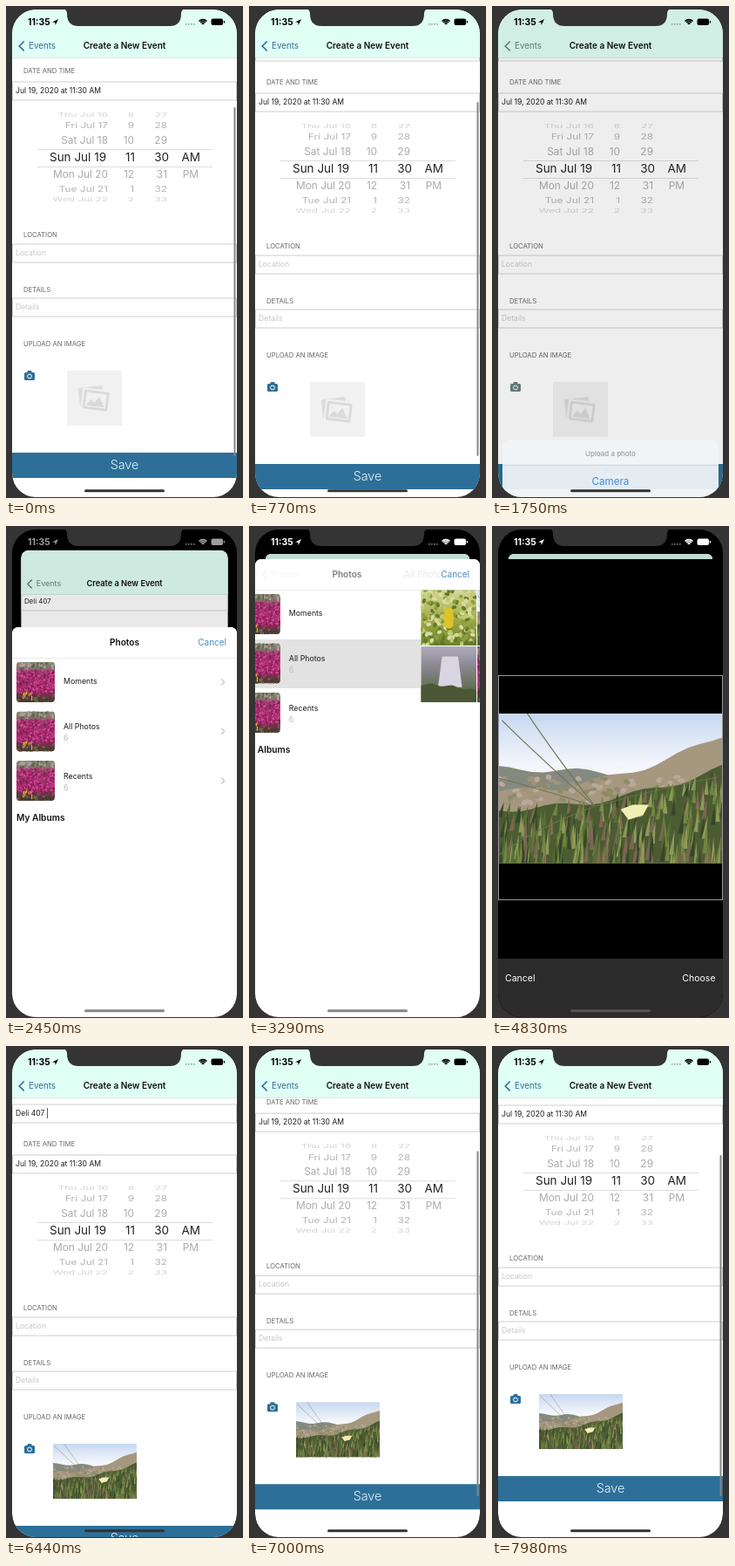
These frames come from a looping animation (272 by 564 pixels, 8000 ms). An HTML page with a canvas:

```html
<!DOCTYPE html>
<html lang="en">
<head>
<meta charset="utf-8">
<title>Create a New Event</title>
<style>
html, body { margin: 0; width: 100%; height: 100%; overflow: hidden; background: #343434; }
canvas { display: block; width: 272px; height: 564px; }
</style>
</head>
<body>
<canvas id="stage"></canvas>
<script>
const LOOP = 8000;
const BLUE = '#2d6f98', INACTIVE = '#66807f', LINK = '#4a8cc0', INK = '#1c1c1c';
const LEFT = 7, TOP = 4, WIDTH = 258, HEIGHT = 559, MID = 136;
const canvas = document.getElementById('stage');
const dpr = window.devicePixelRatio || 1;
canvas.width = 272 * dpr;
canvas.height = 564 * dpr;
const c = canvas.getContext('2d');

// ---- timing ----
const lerp = (a, b, k) => a + (b - a) * k;
const between = (t, a, b) => t >= a && t < b;

function ease(t, start, end) {
  const k = Math.min(1, Math.max(0, (t - start) / (end - start)));
  return k * (2 - k);
}

function spring(t, start, speed) {
  const x = Math.max(0, t - start) * speed;
  const v = 1 - (1 + x) * Math.exp(-x);
  return v > 0.995 ? 1 : v;
}

// ---- drawing helpers ----
function scoped(draw) { c.save(); draw(); c.restore(); }
function shifted(dx, draw) { scoped(() => { c.translate(dx, 0); draw(); }); }

function rect(x, y, w, h, color, r = 0) {
  c.fillStyle = color;
  c.beginPath();
  c.roundRect(x, y, w, h, r);
  c.fill();
}

function frame(x, y, w, h, color) {
  c.strokeStyle = color;
  c.lineWidth = 1;
  c.strokeRect(x, y, w, h);
}

function clip(x, y, w, h, r = 0) {
  c.beginPath();
  c.roundRect(x, y, w, h, r);
  c.clip();
}

function arc(x, y, r, from, to, color, width) {
  c.strokeStyle = color;
  c.lineWidth = width;
  c.beginPath();
  c.arc(x, y, r, from, to);
  c.stroke();
}

function text(str, x, y, size, color, align = 'left', weight = 400) {
  c.font = `${weight} ${size}px Inter, Roboto, sans-serif`;
  c.textAlign = align;
  c.textBaseline = 'middle';
  c.fillStyle = color;
  c.fillText(str, x, y);
}

function poly(color, ...points) {
  c.fillStyle = color;
  c.beginPath();
  for (const [x, y] of points) c.lineTo(x, y);
  c.fill();
}

function chevron(x, y, color, dir = -1, size = 5.5) {
  const dx = dir * size / 2;
  c.strokeStyle = color;
  c.lineWidth = size / 3.4;
  c.beginPath();
  c.moveTo(x - dx, y - size);
  c.lineTo(x + dx, y);
  c.lineTo(x - dx, y + size);
  c.stroke();
}

// ---- photos: soft gradients, wavy ridges and seeded dabs in a 1 x 1 square ----
const noise = n => { const v = Math.sin(n * 12.9898) * 43758.5453; return v - Math.floor(v); };

function fade(...colors) {
  const g = c.createLinearGradient(0, 0, 0, 1);
  colors.forEach((color, i) => g.addColorStop(i / (colors.length - 1), color));
  rect(0, 0, 1, 1, g);
}

// Ground whose upper edge runs from one height to another
function ridge(color, from, to) {
  c.fillStyle = color;
  c.beginPath();
  for (let x = 0; x <= 1.01; x += 0.05) c.lineTo(x, lerp(from, to, x * x) + 0.02 * Math.sin(x * 17 + from * 30));
  c.lineTo(1, 1);
  c.lineTo(0, 1);
  c.fill();
}

function dabs(count, top, bottom, size, ...colors) {
  for (let i = 0; i < count; i++) {
    const n = i + top * 50;
    c.fillStyle = colors[i % colors.length];
    c.beginPath();
    c.ellipse(noise(n), lerp(top, bottom, noise(n + 0.4)), size, size * 0.7, noise(n + 0.7) * 3, 0, 7);
    c.fill();
  }
}

function cascade(x, y, width, height, color) {
  poly(color, [x, y], [x + width * 0.8, y], [x + width, y + height], [x - width * 0.2, y + height]);
}

function dunes() {
  fade('#c6d8f1', '#f2f5fa', '#ffffff', '#ffffff');
  ridge('#858a80', 0.37, 0.5);
  ridge('#a5987f', 0.52, 0.14);
  dabs(90, 0.42, 0.6, 0.018, '#b9a999', '#a1937c', '#8f8a69');
  ridge('#4b5b32', 0.64, 0.36);
  for (let i = 0; i < 300; i++) {
    const depth = i / 300, x = noise(i + 0.3), size = 0.05 + depth * 0.05;
    const y = lerp(0.64 - 0.26 * x * x, 1.02, depth);
    const color = ['#71863f', '#37462a', '#566f34', '#7d6653', '#8d9a58'][i % 5];
    poly(color, [x - 0.008, y + size], [x + 0.02 * noise(i + 9), y - size], [x + 0.012, y + size]);
  }
  c.strokeStyle = '#6d7450';
  c.lineWidth = 0.005;
  for (const angle of [-2.4, -2.2, -2.87, 2.65, -0.23]) {
    const dx = 0.56 * Math.cos(angle), dy = 0.85 * Math.sin(angle);
    c.beginPath();
    c.moveTo(0.43, 0.62);
    c.quadraticCurveTo(0.43 + dx * 0.6, 0.58 + dy * 0.5, 0.43 + dx, 0.62 + dy);
    c.stroke();
  }
  poly('#f2edb4', [0.545, 0.64], [0.6, 0.61], [0.67, 0.61], [0.645, 0.68], [0.58, 0.71]);
}

function lemons() {
  fade('#d5d99a', '#a3ad4a', '#6d842e');
  dabs(160, 0, 1, 0.045, '#8c9f3d', '#bfc96e', '#637a2a', '#d8dca0');
  rect(0.42, 0.32, 0.16, 0.38, '#dfc227', 0.08);
}

function goldenFalls() {
  fade('#b9a98d', '#f1dcae', '#a98f68', '#4e4a2b');
  cascade(0.4, 0.3, 0.5, 0.3, '#ece7dc');
  ridge('#49462b', 0.48, 0.72);
  dabs(110, 0.6, 1, 0.03, '#70713a', '#38371f', '#857a40');
}

function whiteFalls() {
  fade('#cfd0d4', '#74777a', '#45483a');
  ridge('#4a4c38', 0.75, 0.15);
  dabs(60, 0.5, 1, 0.04, '#676a3c', '#33362b', '#55583f');
  cascade(0.25, 0, 0.35, 0.5, '#f4f4f6');
  cascade(0.2, 0.45, 0.25, 0.55, '#e9e9ed');
}

function paleFalls() {
  fade('#b0acba', '#8d8996', '#6c735f', '#4a5639');
  cascade(0.38, 0.18, 0.36, 0.55, '#d8d4e2');
  ridge('#4b5836', 0.68, 0.8);
}

function blossoms() {
  fade('#8c9380', '#97386a', '#a82a69', '#3d3b2a');
  dabs(50, 0, 0.18, 0.035, '#5a6448', '#aaa595', '#79805e');
  dabs(420, 0.2, 0.8, 0.028, '#bd2f7b', '#7a1c4c', '#d2509a', '#9c2566');
  dabs(90, 0.8, 1, 0.03, '#39422a', '#686b45', '#7a2a52');
  shifted(0.1, () => { c.scale(0.32, 1); dabs(10, 0.77, 0.95, 0.045, '#ecc52c'); });
}

// Paints a picture of the given aspect ratio so that it covers the box
function photo(paint, x, y, w, h, r = 0) {
  const aspect = paint === dunes ? 1.505 : 1;
  const tall = Math.max(h, w / aspect), wide = tall * aspect;
  scoped(() => {
    clip(x, y, w, h, r);
    c.translate(x + (w - wide) / 2, y + (h - tall) / 2);
    c.scale(wide, tall);
    paint();
  });
}

// ---- event form; every part hangs on the scroll position s ----
function field(y, label, color) {
  frame(LEFT + 0.5, y - 10, WIDTH - 1, 21, '#cfcfcf');
  text(label, 11, y, 8.6, color);
}

function picker(cy) {
  const names = ['Thu', 'Fri', 'Sat', 'Sun', 'Mon', 'Tue', 'Wed'];
  const shades = ['#222', '#aaa', '#b4b4b4', '#d2d2d2'];
  names.forEach((name, i) => {
    const d = i - 3, far = Math.abs(d), angle = d * 0.36;
    const size = far ? 11.9 : 13.5, grow = far ? 0 : 1;
    const put = (label, x) => text(label, x, 0, size, shades[far], 'right');
    scoped(() => {
      c.translate(0, cy + 55 * Math.sin(angle));
      c.scale(1, Math.cos(angle));
      put(`${name} Jul ${16 + i}`, 117 - 2 * grow);
      put((i + 7) % 12 + 1, 147 + grow);
      put(27 + i, 185 + 2 * grow);
      if (d === 0) put('AM', 223);
      if (d === 1) put('PM', 221);
    });
  });
  for (const side of [-10, 10]) rect(36, cy + side, 201, 1, '#ddd');
}

function cameraIcon(x, y, tint) {
  rect(x - 6, y - 4, 12, 9, tint, 1.5);
  rect(x - 2.5, y - 6, 5, 3, tint, 1);
  arc(x, y + 0.5, 2.4, 0, 7, '#fff', 1);
}

function placeholder(x, y) {
  rect(x, y, 63, 63, '#f1f1f1');
  scoped(() => {
    c.translate(x + 32, y + 31);
    c.rotate(-0.12);
    rect(-18, -13, 28, 22, '#dcdcdc', 2);
    c.rotate(0.24);
    rect(-15, -10, 32, 25, '#f1f1f1', 2);
    rect(-13, -8, 29, 22, '#dadada', 2);
    rect(-10, -5, 23, 16, '#f1f1f1');
    poly('#dadada', [-9, 10], [-4, 2], [0, 6], [5, -2], [12, 10]);
  });
}

function form(t, s, tint) {
  rect(LEFT, TOP, WIDTH, 560, '#fff');
  field(s - 36, 'Deli 407', INK);
  if (t > 5880) rect(47, s - 42, 1, 12, BLUE);
  field(s + 22, 'Jul 19, 2020 at 11:30 AM', INK);
  field(s + 208, 'Location', '#c6c6c6');
  field(s + 270, 'Details', '#c6c6c6');
  text('DATE AND TIME', 20, s, 7.7, '#666');
  ['LOCATION', 'DETAILS', 'UPLOAD AN IMAGE'].forEach((label, i) => text(label, 20, s + 188 + i * 62.3, 7.7, '#666'));
  picker(s + 99);
  cameraIcon(27, s + 349, tint);
  if (t > 5460) photo(dunes, 54, s + 343, 96, 63);
  else placeholder(70, s + 343);
  rect(LEFT, s + 437, WIDTH, 29, BLUE);
  text('Save', MID, s + 452, 14.3, '#eaf4fa', 'center', 300);

  scoped(() => {
    c.globalAlpha = 1 - ease(t, 850, 1150) + ease(t, 6480, 6600);
    const top = 116 + (75 - s) * 0.47;
    rect(261.5, top, 2, 516 - top, '#858585', 1);
  });

  rect(LEFT, TOP, WIDTH, 55, '#e0fff5');
  rect(LEFT, 59, WIDTH, 0.6, '#bccfca');
  chevron(18, 46, tint);
  text('Events', 26, 46, 9.8, tint);
  text('Create a New Event', MID, 46, 10, '#111', 'center', 600);
}

// ---- action sheet ----
function actionSheet(t, p) {
  if (!p) return;
  rect(0, 0, 272, 564, `rgba(0,0,0,${0.18 * p})`);
  const y = 564 - 177 * p, row = 39, x = 12, w = 248;
  const option = (label, cy, weight) => text(label, MID, cy, 11.6, '#3d8fdc', 'center', weight);
  rect(x, y, w, 30 + 2 * row, 'rgba(241,245,248,.94)', 9);
  text('Upload a photo', MID, y + 16, 8, '#8c9195', 'center');
  ['Camera', 'Photo Library'].forEach((label, i) => {
    const top = y + 29 + i * row;
    rect(x, top, w, 0.6, '#d0d4d8');
    if (i && between(t, 1470, 1560)) rect(x, top, w, row, 'rgba(0,0,0,.08)');
    option(label, top + row / 2, 400);
  });
  rect(x, y + 35 + 2 * row, w, row, '#fff', 9);
  option('Cancel', y + 35 + 2.5 * row, 600);
}

// ---- photo library, drawn relative to the modal's top edge ----
function albumList(t) {
  rect(LEFT, 0, WIDTH, 540, '#fff');
  if (between(t, 3150, 3420)) rect(LEFT, 92, WIDTH, 56, '#e2e2e2');
  ['Moments', 'All Photos', 'Recents'].forEach((name, i) => {
    const y = 40 + i * 56.5;
    photo(blossoms, 12, y, 44, 46, 4);
    text(name, 66, y + (i ? 18 : 22), 8.8, INK);
    if (i) text(6, 66, y + 31, 8.8, '#bbb');
    chevron(249, y + 23, '#bbb', 1, 3.5);
  });
  text('My Albums', 12, 219, 10.2, '#111', 'left', 600);
}

function photoGrid() {
  rect(LEFT, 0, WIDTH, 540, '#fff');
  [lemons, dunes, goldenFalls, whiteFalls, paleFalls, blossoms].forEach((paint, i) =>
    photo(paint, LEFT + (i % 4) * 64.75, 35 + Math.floor(i / 4) * 65, 63.7, 64));
}

function libraryHeader(push) {
  rect(LEFT, 0, WIDTH, 35, '#fff');
  rect(LEFT, 35, WIDTH, 0.6, '#d5d5d5');
  scoped(() => {
    c.globalAlpha = (1 - push) ** 2;
    text('Photos', MID - 90 * push, 18, 10.1, '#111', 'center', 600);
    c.globalAlpha = push ** 2;
    text('All Photos', MID + 90 * (1 - push), 18, 10.1, '#111', 'center', 600);
    chevron(18, 18, LINK);
    text('Photos', 25.5, 18, 10, LINK);
  });
  text('Cancel', 253, 18, 10, LINK, 'right');
}

function cropper(t) {
  rect(LEFT, 0, WIDTH, 540, '#000');
  photo(dunes, LEFT, 177, WIDTH, 171.4);
  frame(LEFT + 0.5, 133.5, WIDTH - 1, WIDTH - 1, '#999');
  rect(LEFT, 458, WIDTH, 80, '#2b2b2b');
  const color = between(t, 5390, 5460) ? '#999' : '#fff';
  text('Cancel', 15, 480.5, 10.5, color);
  text('Choose', 256.5, 480.5, 10.5, color, 'right');
}

function library(t, p) {
  if (!p) return;
  const push = spring(t, 3220, 0.014), crop = spring(t, 4130, 0.012);
  scoped(() => {
    c.translate(0, lerp(564, 38, p));
    clip(LEFT, 0, WIDTH, 560, [7, 7, 0, 0]);
    if (crop < 1) shifted(-77 * crop, () => {
      if (push < 1) shifted(-77 * push, () => albumList(t));
      if (push > 0) shifted(WIDTH * (1 - push), photoGrid);
      libraryHeader(push);
    });
    if (crop > 0) shifted(WIDTH * (1 - crop), () => cropper(t));
  });
}

// ---- device ----
function statusBar(p) {
  const v = Math.round(255 * p ** 3), color = `rgb(${v},${v},${v})`;
  text('11:35', 25, 18.5, 10.4, color, 'left', 700);
  poly(color, [53, 18.5], [60, 15], [56.7, 22], [56.3, 18.8]);
  for (let i = 0; i < 4; i++) rect(206 + i * 3, 20, 1.7, 1.7, '#8a9696', 1);
  for (const r of [2, 4.2, 6.4]) arc(226, 22, r, -Math.PI * 0.75, -Math.PI * 0.25, color, 1.6);
  rect(235.5, 14.5, 13.5, 7.5, color, 2);
  rect(249.8, 17, 1.2, 2.5, color);
}

function notch() {
  for (const side of [-1, 1]) scoped(() => {
    c.translate(135.5, 0);
    c.scale(side, 1);
    c.fillStyle = '#343434';
    c.beginPath();
    c.moveTo(-1, 3);
    c.lineTo(70, 3);
    c.quadraticCurveTo(65.5, 4, 65.5, 9);
    c.quadraticCurveTo(65.5, 23, 52, 23);
    c.lineTo(-1, 23);
    c.fill();
  });
}

function draw(t) {
  const sheet = spring(t, 790, 0.016) * (1 - ease(t, 1590, 2007));
  const modal = spring(t, 2143, 0.011) * (1 - spring(t, 5890, 0.016));
  const scroll = 75 - 15 * ease(t, 70, 280) + 28 * ease(t, 490, 760)
    + 25 * ease(t, 2150, 2900) - 57 * ease(t, 6480, 7350);
  const cropping = between(t, 4300, 5900);

  c.setTransform(dpr, 0, 0, dpr, 0, 0);
  rect(0, 0, 272, 564, '#343434');
  scoped(() => {
    clip(LEFT, TOP, WIDTH, HEIGHT, 27);
    rect(0, 0, 272, 564, '#000');
    scoped(() => {
      const size = 1 - 24 / WIDTH * modal;
      c.translate(LEFT + 12 * modal, TOP + 28 * modal);
      c.scale(size, size);
      c.translate(-LEFT, -TOP);
      clip(LEFT, TOP, WIDTH, 560, lerp(27, 7, modal));
      form(t, scroll, sheet || modal ? INACTIVE : BLUE);
      rect(LEFT, TOP, WIDTH, 560, `rgba(0,0,0,${0.14 * modal ** 3})`);
    });
    actionSheet(t, sheet);
    library(t, modal);
    statusBar(modal);
    rect(90, 554.3, 92, 3, cropping ? '#555' : modal > 0.5 ? '#858585' : '#333', 1.5);
  });
  notch();
}

const begin = performance.now();
function tick() {
  draw((performance.now() - begin) % LOOP);
  requestAnimationFrame(tick);
}
tick();
</script>
</body>
</html>
```
